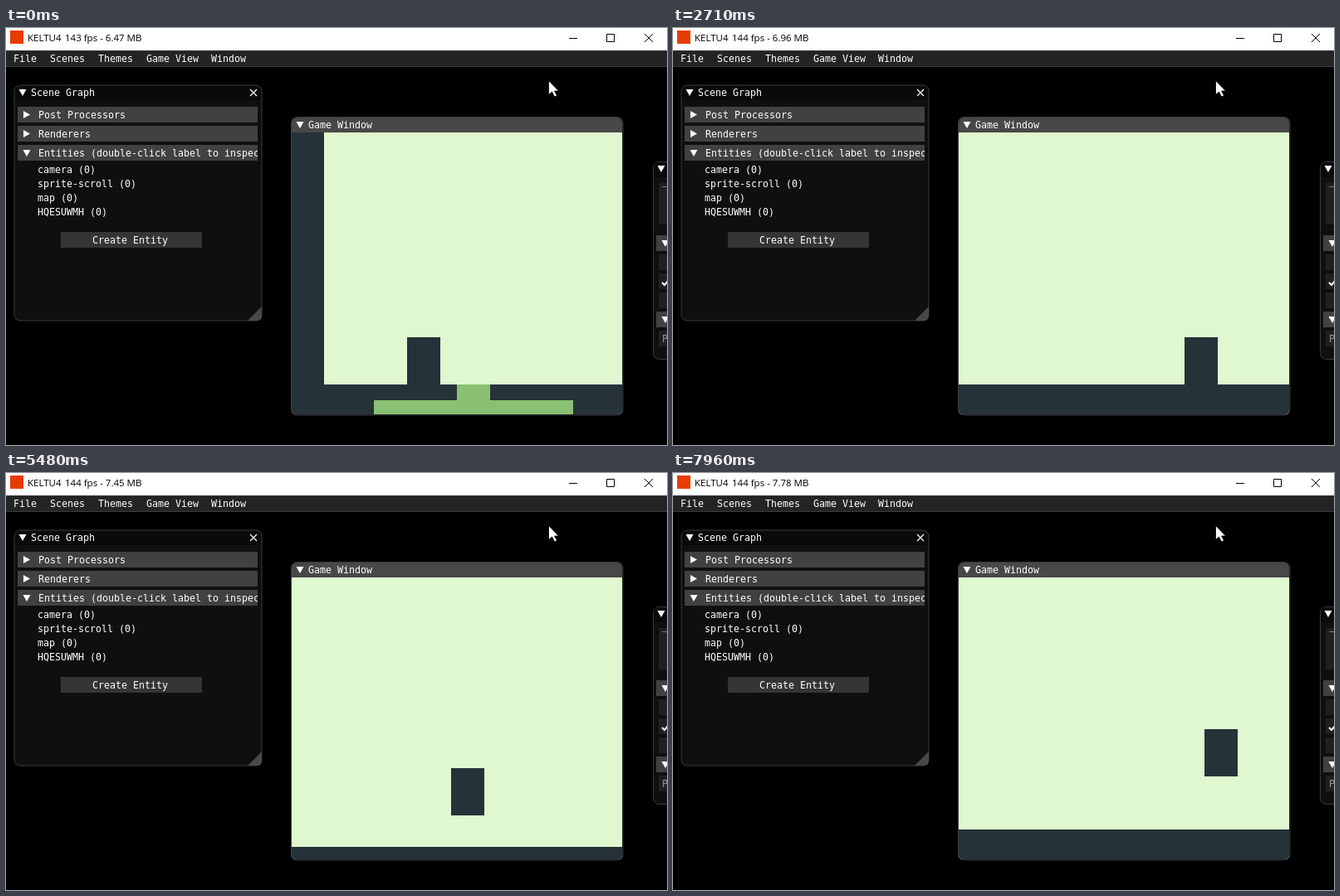
Animation of 796 by 503 pixels, one loop 7990 ms. Source, as an HTML page:

```html
<!DOCTYPE html>
<html lang="en">
<head>
<meta charset="utf-8">
<title>Scene editor</title>
<style>
  html, body { margin: 0; width: 100%; height: 100%; overflow: hidden; background: #000; }
  svg { display: block; }
  text { font: 11.63px "DejaVu Sans Mono", monospace; fill: #fff; white-space: pre; }
  .caption text { font: 11.5px "Open Sans", sans-serif; fill: #000; }
  .panel { fill: #0f0f0f; stroke: #3b3b3e; }
  .bar { fill: #0a0a0a; }
  .head { fill: #414141; }
  .field { fill: #202020; }
  .mark { fill: #fff; }
  .dark { fill: #253238; }
  .leaf { fill: #8ac072; }
</style>
</head>
<body>
<svg width="796" height="503" viewBox="0 0 796 503">
  <defs>
    <path id="open" class="mark" d="M0 0h9l-4.5 8z"/>
    <path id="shut" class="mark" d="M0 0l8 4.5l-8 4.5z"/>
    <clipPath id="view"><path d="M344 126h398v334q0 6-6 6H350q-6 0-6-6z"/></clipPath>
    <clipPath id="label"><rect x="14" y="141" width="289" height="19"/></clipPath>
  </defs>

  <g class="caption">
    <rect width="796" height="27" fill="#fff"/>
    <rect x="5" y="3" width="16" height="16" fill="#e73c00"/>
    <text x="26" y="16">KELTU4</text>
    <text x="71" y="16" id="stats"></text>
    <path d="M678 12.5h10M723.5 7.5h9v9h-9zM769 7l10 10M779 7l-10 10" fill="none" stroke="#000"/>
  </g>

  <rect y="27" width="796" height="19" fill="#242424"/>
  <path d="M0 27.5h796M0 46.5h796" stroke="#3b3b3e"/>
  <text x="9" y="41">File</text>
  <text x="53" y="41">Scenes</text>
  <text x="111" y="41">Themes</text>
  <text x="169" y="41">Game View</text>
  <text x="247" y="41">Window</text>

  <rect class="panel" x="10" y="69" width="298" height="284" rx="7"/>
  <path class="bar" d="M11 87V76q0-6 6-6h284q6 0 6 6v11z"/>
  <use href="#open" x="15.500" y="74"/>
  <text x="30" y="82">Scene Graph</text>
  <path d="M294 74l8 8M302 74l-8 8" stroke="#fff" stroke-width="1.2"/>
  <path class="head" d="M14 95h289v19H14zM14 118h289v19H14zM14 141h289v19H14z"/>
  <use href="#shut" x="21" y="100"/>
  <use href="#shut" x="21" y="123"/>
  <use href="#open" x="20.500" y="147"/>
  <text x="39" y="109">Post Processors</text>
  <text x="39" y="132">Renderers</text>
  <g clip-path="url(#label)"><text x="39" y="155">Entities (double-click label to inspect)</text></g>
  <text x="38" y="175">camera (0)</text>
  <text x="38" y="192">sprite-scroll (0)</text>
  <text x="38" y="209">map (0)</text>
  <text x="38" y="226">HQESUWMH (0)</text>
  <rect x="66" y="246" width="170" height="19" fill="#353535"/>
  <text x="104" y="260">Create Entity</text>
  <path d="M291 353l17-17v11q0 6-6 6z" fill="#494949"/>

  <rect class="panel" x="343.500" y="107.500" width="399.500" height="359.500" rx="7"/>
  <path d="M344 126v-11q0-7 7-7h384q7 0 7 7v11z" fill="#484848"/>
  <use href="#open" x="349.500" y="113"/>
  <text x="364" y="121">Game Window</text>
  <g clip-path="url(#view)">
    <rect x="344" y="126" width="398" height="341" fill="#dff8d0"/>
    <rect class="dark" id="ground" x="344" width="398" height="60"/>
    <g id="scenery">
      <rect class="dark" x="343" y="126" width="40" height="341"/>
      <path class="leaf" d="M543 430h40v19h100v18H443v-18h100z"/>
    </g>
    <rect class="dark" id="player" width="40" height="57"/>
  </g>

  <rect class="panel" x="779.500" y="161.500" width="60" height="238" rx="7"/>
  <path class="bar" d="M780 180v-12q0-6 6-6h10v18z"/>
  <use href="#open" x="784.500" y="166"/>
  <path class="field" d="M786 187h10v50h-10zM786 273h10v19h-10zM786 296h10v19h-10zM786 319h10v19h-10zM786 365h10v19h-10z"/>
  <path d="M790 191.500h6" stroke="#777"/>
  <path class="head" d="M783 250h13v19h-13zM783 342h13v19h-13z"/>
  <use href="#open" x="789.500" y="256"/>
  <use href="#open" x="789.500" y="348"/>
  <path d="M790 307l3 3l5-6" fill="none" stroke="#fff" stroke-width="2"/>
  <text x="790" y="379" style="fill:#999">P</text>

  <path d="M653.500 63.500v17l4-3.500l3 6l3-1.500l-3-5.500h5z" fill="#fff" stroke="#000" stroke-width=".8"/>
</svg>
<script>
const LOOP = 7990, SPEED = 0.25;              // px per ms
const ENTER = 3515, LEAVE = 7615;             // stay in the second room
const JUMP_TIME = 630, JUMP_HEIGHT = 90;
const jumps = [830, 1530, 3489, 4136, 4770, 5405, 6440, 7185, 7815];
// time, screen x of the player; the camera holds it between 511 and 536
const path = [
  [30, 483], [170, 448], [260, 448], [612, 536], [2392, 536], [2710, 616],
  [3150, 616], [3240, 638], [ENTER, 638], [ENTER, 312], [4411, 536],
  [5751, 536], [5851, 511], [7190, 511], [LEAVE, 405], [LEAVE, 727], [LOOP, 633]
];
const memory = [6.47, 6.63, 6.80, 6.96, 7.12, 7.29, 7.45, 7.62, 7.78];
const el = id => document.getElementById(id);
const clamp = (v, lo, hi) => Math.min(hi, Math.max(lo, v));

function playerX(t) {
  const i = path.findIndex(p => p[0] > t);
  if (i <= 0) return path[0][1];
  const [t0, x0] = path[i - 1], [t1, x1] = path[i];
  return x0 + (x1 - x0) * (t - t0) / (t1 - t0);
}

function lift(t) {
  if (t > 3240 && t < ENTER) return 0;
  const start = jumps.find(s => t >= s && t < s + JUMP_TIME);
  if (start === undefined) return 0;
  const u = 2 * (t - start) / JUMP_TIME - 1;
  return JUMP_HEIGHT * (1 - u * u);
}

function draw(t) {
  const second = t >= ENTER && t < LEAVE;
  const floor = second ? 451 : 430;
  const camera = clamp(SPEED * (t - 610), 0, 445);
  el("ground").setAttribute("y", floor);
  el("scenery").setAttribute("visibility", second ? "hidden" : "visible");
  el("scenery").setAttribute("transform", `translate(${-Math.round(camera)})`);
  el("player").setAttribute("x", Math.round(playerX(t)));
  el("player").setAttribute("y", Math.round(floor - 57 - lift(t)));

  const tick = clamp(Math.floor((t - 800) / 910) + 1, 0, 8);
  const fps = tick === 0 || tick === 7 ? 143 : 144;
  el("stats").textContent = `${fps} fps - ${memory[tick].toFixed(2)} MB`;
}

const begin = performance.now();
function frame() {
  draw((performance.now() - begin) % LOOP);
  requestAnimationFrame(frame);
}
draw(0);
requestAnimationFrame(frame);
</script>
</body>
</html>
```
